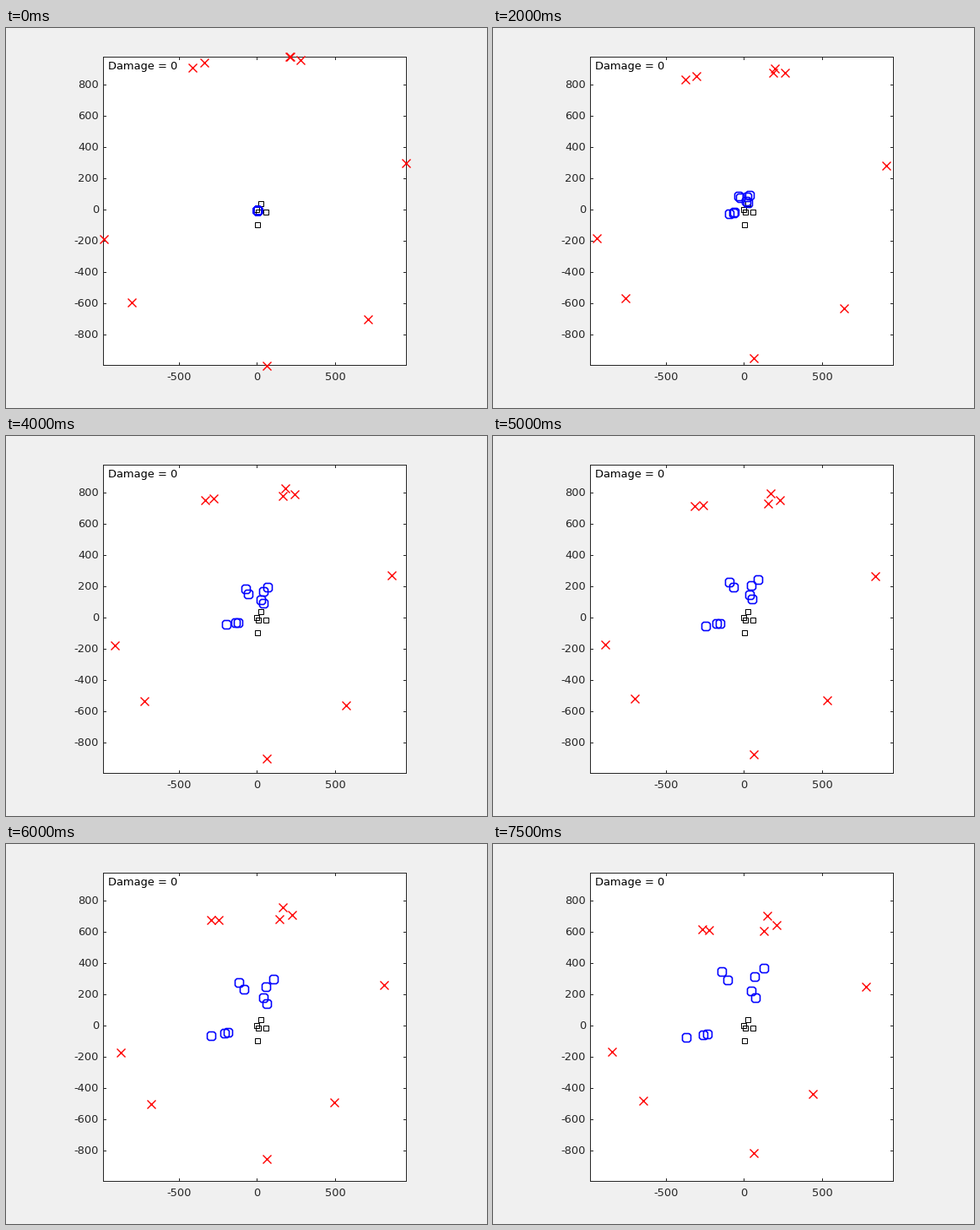
Animation of 570x450 px, one loop 8000 ms. Source, as a matplotlib script:

```python
import numpy as np
import matplotlib.pyplot as plt
from matplotlib.animation import FuncAnimation
from matplotlib.patches import Rectangle
from matplotlib.path import Path

W, H, FRAMES = 570, 450, 16
LEFT, RIGHT, TOP, BOTTOM = 115, 474, 34, 399
X0, Y0, SCALE = 297.5, 215.3, 0.185
RADIUS, HOME = 1000, np.array([3, -4])
INK = "#262626"

ASSETS = np.array([(-3, 0), (8, -16), (24, 38), (57, -16), (3, -97)])

# Attackers start on a circle and head straight for one asset each
bearing = np.radians([114.4, 109.8, 77.8, 78, 73.8, 17.3, 190.9, 216.5,
                      315.4, 273.6])
speed = np.array([21.8, 23.2, 18.8, 25.3, 21.4, 12, 9.3, 13.1, 25.2, 12.2])
aim = [2, 0, 0, 0, 3, 2, 1, 0, 1, 3]

start = RADIUS * np.column_stack([np.cos(bearing), np.sin(bearing)])
way = ASSETS[aim] - start
velocity = way * (speed / np.hypot(*way.T))[:, None]

# Each defender leaves home to meet one attacker at a given step
prey = [0, 1, 4, 2, 3, 4, 6, 6, 6]
meet = np.array([21.3, 22.6, 21, 24.7, 24.6, 29, 29, 36.8, 39.3])[:, None]
pursuit = (start[prey] + velocity[prey] * meet - HOME) / meet

plt.rcParams["font.family"] = "DejaVu Sans"
fig = plt.figure(figsize=(W / 72, H / 72), dpi=72, facecolor="#f0f0f0")
ax = fig.add_axes([0, 0, 1, 1])
ax.set(xlim=(0, W), ylim=(H, 0))
ax.axis("off")


def line(xs, ys):
    ax.plot(xs, ys, color=INK, lw=1, antialiased=False,
            solid_capstyle="projecting")


def label(x, y, text, ha, color=INK):
    ax.text(x, y, text, ha=ha, va="baseline", fontsize=13, color=color)


def markers(shape, size, color, width):
    return ax.plot([], [], ls="none", marker=shape, ms=size, mec=color,
                   mfc="none", mew=width, antialiased=False)[0]


def place(artist, points):
    artist.set_data(X0 + SCALE * points[:, 0], Y0 - SCALE * points[:, 1])


ax.add_patch(Rectangle((LEFT, TOP), RIGHT - LEFT, BOTTOM - TOP,
                       fc="white", ec="none"))
line([LEFT, RIGHT, RIGHT, LEFT, LEFT], [TOP, TOP, BOTTOM, BOTTOM, TOP])

for v in range(-800, 801, 200):
    y = round(Y0 - v * SCALE)
    line([LEFT, LEFT + 3], [y, y])
    line([RIGHT - 3, RIGHT], [y, y])
    label(110, y + 4, str(v), "right")

for v in (-500, 0, 500):
    x = int(X0 + v * SCALE)
    line([x, x], [TOP, TOP + 3])
    line([x, x], [BOTTOM - 3, BOTTOM])
    label(x + 0.5, 417, str(v), "center")

label(121, 49, "Damage = 0", "left", "black")

# Pixelated ring: a square with cut corners
corner = [(3, 5), (5, 3)]
ring = Path([(x, y) for x, y in corner]
            + [(x, -y) for x, y in corner[::-1]]
            + [(-x, -y) for x, y in corner]
            + [(-x, y) for x, y in corner[::-1]] + corner[:1])

place(markers("s", 6, "black", 1), ASSETS)
crosses = markers("x", 10, "red", 1.4)
rings = markers(ring, 10, "blue", 1.6)


def update(i):
    place(crosses, start + velocity * i)
    place(rings, HOME + pursuit * i)
    return crosses, rings


anim = FuncAnimation(fig, update, frames=FRAMES, interval=500,
                     repeat=True, repeat_delay=0)
plt.show()
```
